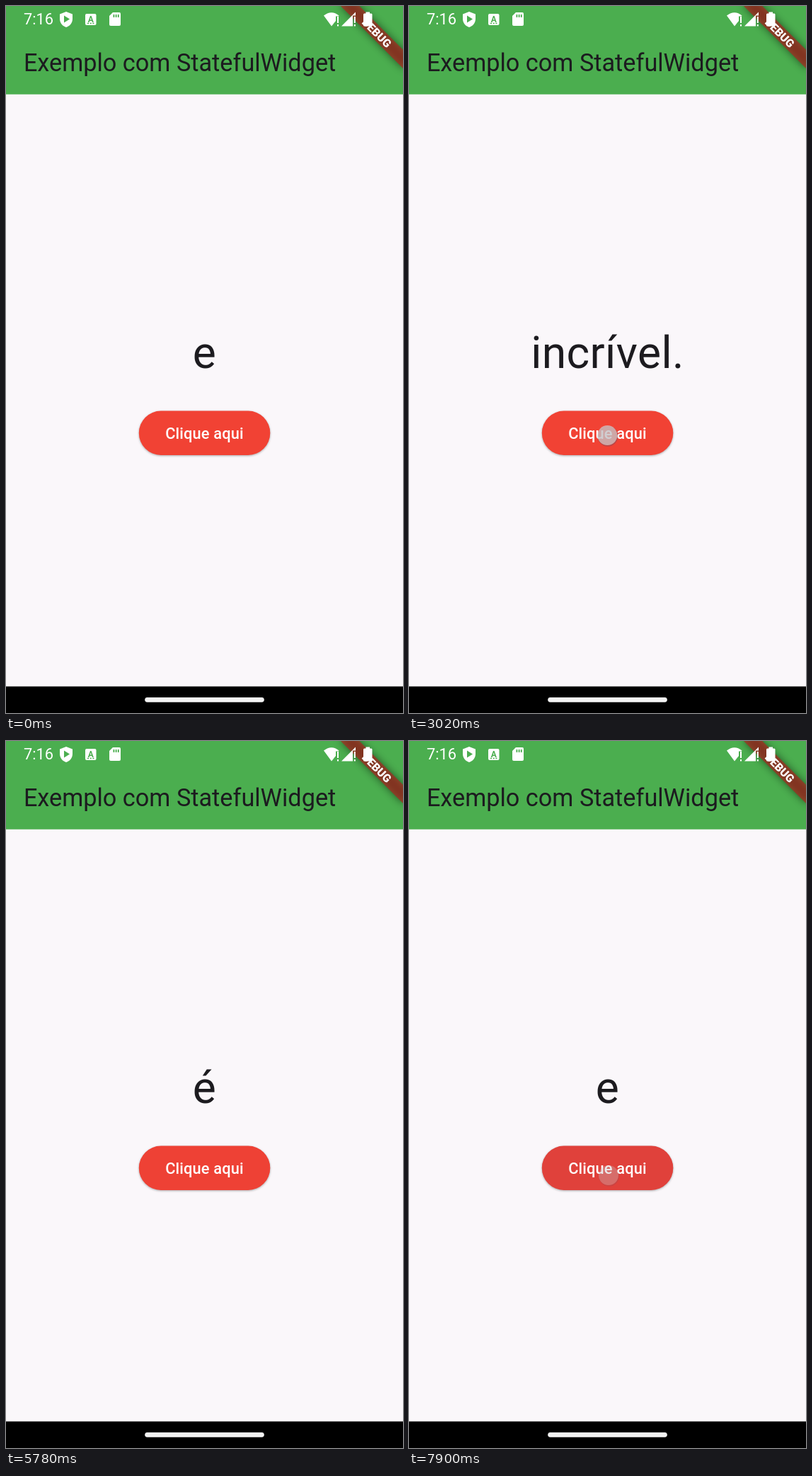
Animation, 561 px wide and 998 px high, one loop 8000 ms. Source, as an HTML page:

```html
<!DOCTYPE html>
<html lang="pt">
<head>
<meta charset="utf-8">
<style>
html, body { margin: 0; width: 100%; height: 100%; overflow: hidden; background: #faf7fa; }
svg { display: block; width: 100vw; height: 100vh; font-family: Roboto, sans-serif; }
.blur { filter: blur(6px); }
.lift { filter: drop-shadow(0 1.6px 1.6px rgba(0, 0, 0, .32)); }
</style>
</head>
<body>
<svg viewBox="0 0 561 998">
  <rect width="561" height="998" fill="#faf7fa"/>
  <rect width="561" height="124.7" fill="#4bae4f"/>
  <text x="24.9" y="92" font-size="34.28" fill="#1c1b1f">Exemplo com StatefulWidget</text>

  <text id="word" x="280.5" y="511" font-size="62.34" letter-spacing=".39" text-anchor="middle" fill="#1c1b1f">e</text>

  <rect class="lift" x="187.8" y="571.6" width="185.5" height="62.3" rx="31.1" fill="#f14234"/>
  <rect id="ink" x="187.8" y="571.6" width="185.5" height="62.3" rx="31.1" fill="#793a66" opacity="0"/>
  <text x="280.5" y="610.8" font-size="21.8" font-weight="500" letter-spacing=".156" text-anchor="middle" fill="#fff">Clique aqui</text>

  <!-- debug ribbon -->
  <g transform="translate(561 0) rotate(45)">
    <rect class="blur" x="-62.3" y="43.6" width="124.6" height="18.7" opacity=".5"/>
    <rect x="-62.3" y="43.6" width="124.6" height="18.7" fill="#b71c1c" fill-opacity=".627"/>
    <text x=".5" y="58.7" font-size="15.9" font-weight="900" text-anchor="middle" fill="#fff">DEBUG</text>
  </g>

  <!-- status bar -->
  <g fill="#fff">
    <text x="25" y="26.3" font-size="21.8">7:16</text>
    <path d="M85 8L94 11.5V18C94 24 90 28.5 85 30C80 28.5 76 24 76 18V11.5Z"/>
    <rect x="112" y="11" width="15.5" height="16" rx="2"/>
    <path d="M151 9H160Q162 9 162 11V26Q162 28 160 28H148Q146 28 146 26V14Z"/>
    <path d="M449 13.5Q460 5 470.5 13.5L470 14.5H466V21L460 28.5Z"/>
    <path d="M468 15h2v9h-2zM468 26h2v2.4h-2z"/>
    <path d="M474 28.5L494 8.5V13.5H490V28.5Z"/>
    <path d="M491.8 15h2v9h-2zM491.8 26h2v2.4h-2z"/>
    <path d="M508.5 8.5H514V10.5H516Q517.5 10.5 517.5 12V27Q517.5 28.5 516 28.5H506.5Q505 28.5 505 27V12Q505 10.5 506.5 10.5H508.5Z"/>
  </g>
  <g fill="#4bae4f">
    <path d="M82 13.5L90 18.5L82 23.5Z"/>
    <text x="119.7" y="22.5" font-size="12" font-weight="700" text-anchor="middle">A</text>
    <path d="M115 23.8h2v1.4h-2zM118.7 23.8h2v1.4h-2zM122.4 23.8h2v1.4h-2z"/>
    <path d="M151.5 12h1.8v4h-1.8zM154.7 12h1.8v4h-1.8zM157.9 12h1.8v4h-1.8z"/>
  </g>

  <rect y="960.5" width="561" height="37.5"/>
  <rect x="196.2" y="975.9" width="168.6" height="6.8" rx="3.4" fill="#f4f4f4"/>

  <g id="touch" opacity="0">
    <circle cx=".6" cy="1.2" r="14.4" fill="#55506a" opacity=".35"/>
    <circle r="14" fill="#d6d4d4" fill-opacity=".68"/>
  </g>
</svg>
<script>
const LOOP = 8000, LAST = 7900;
const get = id => document.getElementById(id);
const word = get('word'), ink = get('ink'), touch = get('touch');

// each tap: start time, finger path and the word shown on release
const taps = [
  { at: 500, from: [284, 602], to: [298, 636], word: 'incrível.' },
  { at: 2740, from: [280, 598], to: [281, 622], word: 'Flutter' },
  { at: 4380, from: [280, 594], to: [281, 614], word: 'é' },
  { at: 6060, from: [280, 597], to: [281, 622], word: 'legal' },
  { at: 7220, from: [280, 597], to: [282, 613], word: 'e' }
];

const ramp = (t, a, b) => Math.min(1, Math.max(0, (t - a) / (b - a)));
const mix = (a, b, k) => a + (b - a) * k;

function inkAt(dt) {
  return .14 * ramp(dt, 300, 600) - .08 * ramp(dt, 860, 1010) - .06 * ramp(dt, 1160, 1560);
}

function draw(t) {
  let text = 'e', shade = 0, alpha = 0;
  for (const tap of taps) {
    const dt = t - tap.at;
    if (dt < 0) break;
    if (dt >= 620) text = tap.word;
    shade = Math.max(shade * (1 - ramp(dt, 0, 200)), inkAt(dt));
    alpha = (1 - ramp(dt, 500, 920)) ** 1.5;
    const k = ramp(dt, 120, 600);
    const [x, y] = tap.from.map((v, i) => mix(v, tap.to[i], k));
    touch.setAttribute('transform', `translate(${x} ${y})`);
  }
  if (word.textContent !== text) word.textContent = text;
  ink.setAttribute('opacity', shade);
  touch.setAttribute('opacity', alpha);
}

const start = performance.now();
function tick() {
  draw(Math.min((performance.now() - start) % LOOP, LAST));
  requestAnimationFrame(tick);
}
tick();
</script>
</body>
</html>
```
